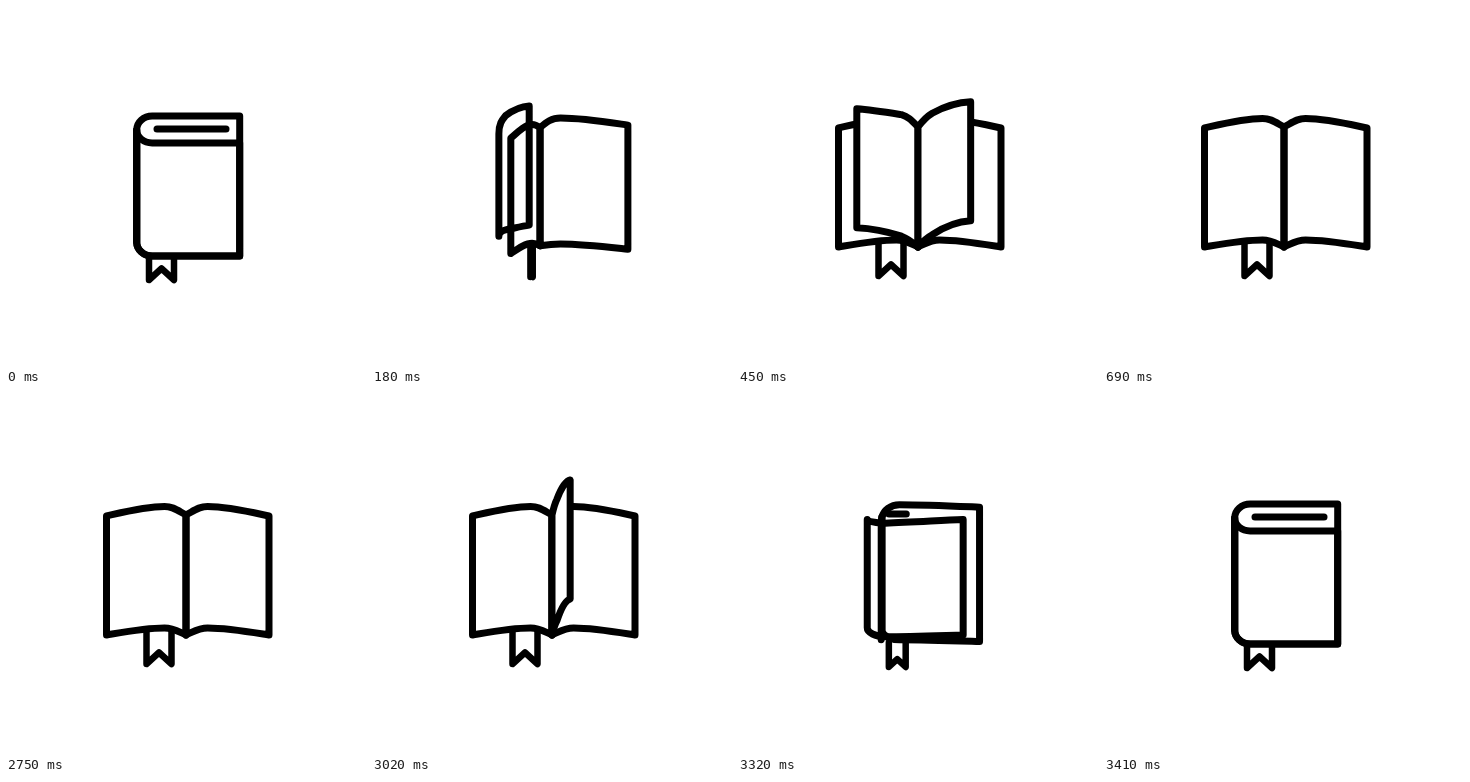
Recreate the animation shown at these times as an HTML page. Size 360x360 px, loop 4.44 s.

```html
<!DOCTYPE html>
<html lang="en">
<head>
<meta charset="utf-8">
<title>Book</title>
<style>
  html, body { margin: 0; width: 100%; height: 100%; overflow: hidden; background: #fff; }
  svg { display: block; width: 100%; height: 100%; }
  path { fill: none; stroke: #000; stroke-width: 7; stroke-linecap: round; stroke-linejoin: round; }
  .sheet { fill: #fff; }
  #ribbon { stroke-width: 6.5; }
</style>
</head>
<body>
<svg viewBox="0 0 360 360">
  <path id="ribbon"/>
  <path id="left"/>
  <path id="right"/>
  <path id="cover"/>
  <path id="slot"/>
  <path class="sheet"/>
  <path class="sheet"/>
  <path class="sheet"/>
</svg>
<script>
const LOOP = 4440, STEP = 30, CLOSE_AT = 2750, CLOSED_AT = 3410;
const COVER_TIME = 300, SPINE_TIME = 265, RIBBON_TIME = 340;
const FIRST_TURN = 315, TURN_GAP = 86, TURN_TIME = 172;

const { PI, sin, cos, min, max, abs } = Math;
const clamp = v => min(1, max(0, v));
const mix = (a, b, k) => a + (b - a) * k;
const smooth = v => v * v * (3 - 2 * v);
const $ = id => document.getElementById(id);
const sheets = document.querySelectorAll('.sheet');
const setPath = (node, d) => node.setAttribute('d', d);

// One page edge from the spine over the shoulder to the free side.
function edge(x, w, bend, round, y, bow, free) {
  const shoulder = y + bow, d = free - bow;
  const rise = clamp(-d / 9);
  const at = (u, v) => [x + w * u, v];
  const out = v => bend + (1 - bend) * v;
  return [
    at(0, y),
    at(bend * .4 * (1 - round), y + bow * .55),
    at(bend * mix(.6, .45, round), shoulder - bow * .25 * rise),
    at(bend, shoulder),
    at(out(.33), shoulder + d * .6 * rise),
    at(out(.68), shoulder + d * (.55 + .4 * rise)),
    at(1, y + free)
  ];
}

// top and bottom: [spine y, shoulder offset, free edge offset]
function page(x, w, bend, round, top, bottom) {
  const [start, ...upper] = edge(x, w, bend, round, ...top);
  const [corner, ...lower] = edge(x, w, bend, round, ...bottom).reverse();
  return `M${start}C${upper.join(' ')}L${corner}C${lower.join(' ')}Z`;
}

function drawBook(o) {
  const k = smooth(clamp(o / SPINE_TIME));
  const x = mix(130.7, 180, k), top = mix(124, 121, k), bottom = mix(236, 241, k);

  setPath($('right'), page(x, mix(103, 83, k), mix(.15, .26, k), 1 - k,
    [top, mix(-14, -8.5, k), mix(-14, 1, k)],
    [bottom, mix(14, -7, k), mix(14, 0, k)]));

  const swing = k ** 3.6, droop = 14 * sin(PI * k);
  setPath($('left'), page(x, -79.5 * swing, .27, 1 - k,
    [top, -8.5 * swing, droop + k],
    [bottom, -7 * swing, droop * .8]));
}

function drawCover(o) {
  const q = clamp(o / COVER_TIME);
  const angle = PI * q ** 1.77;
  const flat = max(0, cos(angle)), up = sin(angle);
  const late = clamp((q - .6) / .4);
  const x = mix(130.7 - 4 * up, 180, late);
  setPath($('cover'), q < 1 ? page(x, 103 * cos(angle), mix(.15, .27, q), 1 - late,
    [124 + 4 * up, 13 * flat - 23 * up, 13 * flat - 33 * up],
    [236 - 6 * up, 14 * flat - 11 * up, 14 * flat - 16 * up]) : '');

  const shrink = clamp(o / 120);
  setPath($('slot'), shrink < 1 ? `M151 ${123 - 4 * shrink}h${69 * (1 - shrink)}` : '');
}

function drawRibbon(o) {
  const q = clamp(o / RIBBON_TIME), k = smooth(clamp(o / SPINE_TIME));
  const turn = abs(cos(PI * q));
  const x = mix(155.5, 153, k) + 6 * sin(PI * q), half = 12.5 * turn;
  const top = mix(253, 236, k), tip = mix(274, 270, k);
  setPath($('ribbon'), `M${x - half} ${top}V${tip}L${x} ${tip - 11.5 * turn}L${x + half} ${tip}V${top}`);
}

function drawSheet(node, p) {
  const angle = PI * p;
  const lift = p > 0 && p < 1 ? 37 * sin(angle) ** 1.4 : 0;
  const bow = -.2 * lift;
  setPath(node, lift ? page(180, 2 + 81 * cos(angle), .27, 0,
    [121, bow - 8.5, 1 - lift],
    [241, bow - 7, -lift]) : '');
}

function draw(t) {
  const o = t < CLOSE_AT
    ? Math.floor(t / STEP) * STEP
    : Math.ceil(max(0, CLOSED_AT - t) / STEP) * STEP;
  drawBook(o);
  drawCover(o);
  drawRibbon(o);
  sheets.forEach((node, i) => drawSheet(node, (o - FIRST_TURN - i * TURN_GAP) / TURN_TIME));
}

const began = performance.now();
function frame() {
  draw((performance.now() - began) % LOOP);
  requestAnimationFrame(frame);
}
frame();
</script>
</body>
</html>
```
